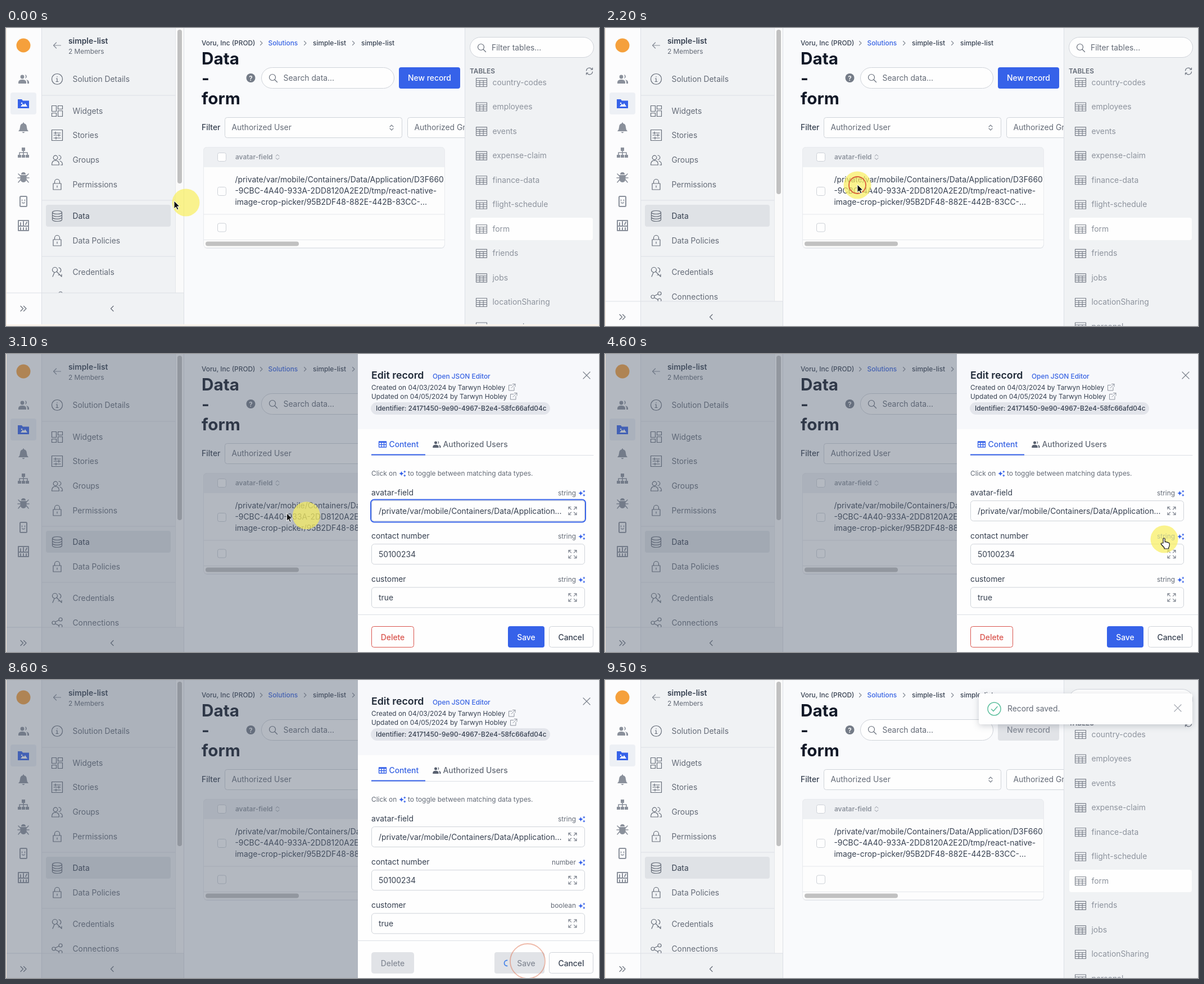
Animation, 1055 px wide and 531 px high, one loop 9.7 s. Source, as an HTML page:

```html
<!DOCTYPE html>
<html lang="en">
<head>
<meta charset="utf-8">
<title>Edit record</title>
<style>
html, body { margin: 0; width: 100%; height: 100%; overflow: hidden; background: #f9fafc; }
svg { display: block; width: 1055px; height: 531px; }
text { font: 400 13.86px Inter, sans-serif; fill: #646b77; white-space: pre; }
.s { font-size: 11.88px; }
.m { font-weight: 500; }
.b { font-weight: 600; }
.h { font-size: 29.7px; font-weight: 700; fill: #111827; }
.title { font-size: 17.8px; font-weight: 600; }
.dark { fill: #374151; }
.ink { fill: #1f2937; }
.pale { fill: #8d939d; }
.blue { fill: #3662e3; }
.white { fill: #fff; }
.red { fill: #d9544d; }
.mid { text-anchor: middle; }
.end { text-anchor: end; }
</style>
</head>
<body>
<svg id="stage" viewBox="0 0 1055 531" xmlns="http://www.w3.org/2000/svg"></svg>
<script>
const LOOP = 9700, STEP = 100;
const BLUE = '#3662e9', RED = '#d9544d', GREY = '#8a909b', LINE = '#dcdfe5', EDGE = '#cfd3d9', BUSY = '#e1e3e7';

// Drawing helpers
const text = (x, y, s, cls = '', id = '') => `<text x="${x}" y="${y}" class="${cls}" id="${id}">${s}</text>`;
const box = (x, y, w, h, fill, r = 0, stroke = 'none', extra = '') =>
  `<rect x="${x}" y="${y}" width="${w}" height="${h}" rx="${r}" fill="${fill}" stroke="${stroke}" ${extra}/>`;
const line = (x, y, d, color = '#666d79', width = 1.2, fill = 'none') =>
  `<path transform="translate(${x} ${y})" d="${d}" fill="${fill}" stroke="${color}" stroke-width="${width}" stroke-linecap="round" stroke-linejoin="round"/>`;
const solid = (x, y, d, color = GREY) => line(x, y, d, 'none', 0, color);
const rule = (x1, x2, y, color = LINE) => line(0, 0, `M${x1} ${y}H${x2}`, color, 1);
const disc = (r, x = 0, y = 0) => `M${x - r} ${y}a${r} ${r} 0 1 0 ${2 * r} 0a${r} ${r} 0 1 0 ${-2 * r} 0z`;
const rect = (x, y, w, h) => `M${x} ${y}h${w}v${h}h${-w}z`;
const field = (x, y, w, h, r = 4) => box(x + .5, y + .5, w - 1, h - 1, '#fefefe', r, EDGE);
const checkbox = (x, y) => box(x - 7.5, y - 7.5, 15, 15, '#fefefe', 3, '#cdd1d7');

const PEOPLE = disc(3.4, -2, -4) + 'M-9 8v-2q0-5 7-5t7 5v2zM3-8a3.6 3.6 0 0 1 0 7q2-3 0-7zM5 1q5 1 5 5v2H7V5q0-2-2-4z';
const MAGNIFIER = disc(5.5, -1, -1) + 'M3 3L7.5 7.5';
const GRID = rect(-9.5, -7.5, 19, 15) + 'M-9.5-3.5h19M-9.5 0h19M-9.5 3.7h19M-3.2-3.5V7.5M3.2-3.5V7.5';
const LOCK = rect(-7, -2, 14, 11) + 'M-4.5-2V-5a4.5 4.5 0 0 1 9 0v3M0 2v3';
const CROSS = 'M-6-6L6 6M6-6L-6 6';
const SORT = 'M-3-1.5L0-4.5L3-1.5M-3 1.5L0 4.5L3 1.5';
const OUT = 'M0-4h-5.5v9.5H4V0M1.5-6H6v4.5M6-6L-1 1';
const SPARK = 'M-1.5-4.5Q-1-.5 3 0Q-1 .5-1.5 4.5Q-2 .5-6 0Q-2-.5-1.5-4.5z' +
  'M2.5-4h1.2v-1.3h1.2V-4h1.2v1.2H4.9v1.3H3.7v-1.3H2.5zM2.5 3h1.2V1.7h1.2V3h1.2v1.2H4.9v1.3H3.7V4.2H2.5z';
const ARROW = 'M0-1V13L3.2 10L5.5 15L8 14L5.7 9H10z';
const HAND = 'M-2 7V0q0-2 1.6-2T1.2 0V5q2-1 3 .5 2-.7 2.7.8 2.3-.3 2.3 2v3q0 2-1.5 3.7v2H0v-2Q-3 12-5.5 9q-.8-2 1-2z';
const expand = (x, y) => [[1, 1], [-1, 1], [1, -1], [-1, -1]].map(([a, b]) =>
  line(x, y, `M${7 * a} ${3 * b}V${7 * b}H${3 * a}M${7 * a} ${7 * b}L${2.5 * a} ${2.5 * b}`, '#7f8590')).join('');

function rail() {
  return box(0, 0, 63, 531, '#fcfcfd') + line(0, 0, 'M63.5 0V531', LINE, 1) +
    '<circle cx="31" cy="31" r="12.5" fill="#f5a03c"/>' +
    solid(31, 91, PEOPLE) + box(8, 115, 46, 39, '#edf0f5', 4) +
    solid(31, 135, 'M-10-8h7l2 2.5h11V8h-20z', BLUE) +
    solid(32, 136, 'M-6 4l4-5 2 2 2-3 4 6z' + disc(1.3, -4, -2), '#fff') +
    solid(31, 178, 'M-9 6q3-3 3-7 0-6 5-7v-1.5h2V-8q5 1 5 7 0 4 3 7zM-2.5 7.3h5q-2.5 4-5 0z') +
    solid(31, 222, rect(-3, -9, 6, 6) + rect(-10, 4, 6, 5) + rect(-3, 4, 6, 5) + rect(4, 4, 6, 5)) +
    line(31, 222, 'M0-3V4M-7 4V0H7V4', GREY, 1.6) +
    solid(31, 266, 'M-4-5a4 4 0 0 1 8 0zM-5.5-4h11v6q0 7-5.5 7t-5.5-7z') +
    line(31, 266, 'M-9-6l4 4M9-6l-4 4M-10 1H10M-9 9l4-5M9 9l-4-5', GREY, 1.6) +
    line(31, 309, 'M-4.5-9h9q1.5 0 1.5 1.5v15q0 1.5-1.5 1.5h-9q-1.5 0-1.5-1.5v-15q0-1.5 1.5-1.5z', GREY, 2) +
    line(31, 309, 'M-2.5-1v-2M2.5-1v-2M-2.5 2q2.5 2 5 0', GREY, 1.4) +
    line(31, 352, rect(-9, -9, 18, 18) + 'M-9 1H9M-5 1v-6M0 1v-8M4-2l2-4M-5 9V4M0 9V4M5 9V4', GREY, 2);
}

function sidebar() {
  const items = [
    [91, 'Solution Details', disc(9.5) + 'M-1.5-1H0V4.5M-2 4.5H2M0-4.5v.4'],
    [148, 'Widgets', rect(-9.5, -9.5, 8, 10) + rect(1.5, -9.5, 8, 6) + rect(-9.5, 3.5, 8, 6) + rect(1.5, -.5, 8, 10)],
    [191, 'Stories', rect(-9.5, -9.5, 19, 19) + 'M-6-4H6M-6 0H6M-6 5H6M-3-6v4M3-2v4M-2 3v4'],
    [235, 'Groups', disc(3.8, -3, -4) + 'M-9.5 9q0-8 6.5-8t6.5 8zM3-8a3.6 3.6 0 0 1 0 7.5M5 2q4.5 1 4.5 7H6.5'],
    [279, 'Permissions', LOCK],
    [335, 'Data', 'M-8.5-6.5a8.5 3 0 0 1 17 0v13a8.5 3 0 0 1-17 0zM-8.5-6.5a8.5 3 0 0 0 17 0M-8.5-2a8.5 3 0 0 0 17 0M-8.5 2.3a8.5 3 0 0 0 17 0'],
    [379, 'Data Policies', LOCK],
    [435, 'Credentials', disc(4.5, -4, -4) + 'M-1-1L8 8V4M5 5H2M3-8a4.5 4.5 0 0 1 2 8M-5 1L-8 8'],
    [479, 'Connections', disc(3, -6, 0) + disc(3, 6, -6) + disc(3, 6, 6) + 'M-3.5-1.5L3.5-5M-3.5 1.5L3.5 5']
  ];
  return box(64, 0, 238, 531, '#f0f2f4') + box(302, 0, 14, 531, '#fafafa') +
    line(0, 0, 'M301.5 0V531', '#e5e7eb', 1) + line(0, 0, 'M316.5 0V531', LINE, 1) +
    box(305, 3, 8, 293, '#c1c1c1', 4, 'none', 'id="thumb"') +
    line(91, 31, 'M6.5 0H-6.5M-1.5-5L-6.5 0L-1.5 5', '#858b96') +
    text(111, 28, 'simple-list', 'b dark') + text(111, 45.5, '2 Members', 's') +
    [120, 307, 407].map(y => rule(64, 301, y)).join('') + box(71, 315, 222, 39, '#dfe2e6', 4) +
    items.map(([y, s, d]) => line(91, y, d) + text(118.5, y + 5, s, s === 'Data' ? 'dark' : '')).join('') +
    '<g id="dock">' + box(0, 487, 63, 60, '#fcfcfd') + box(64, 487, 252, 60, '#f0f2f4') + rule(0, 316, 487) +
    line(31, 515, 'M-5-4.5L-.5 0L-5 4.5M.5-4.5L5 0L.5 4.5') + line(189, 515, 'M2-4.5L-2.5 0L2 4.5') + '</g>';
}

function records() {
  const path = ['/private/var/mobile/Containers/Data/Application/D3F660',
    '-9CBC-4A40-933A-2DD8120A2E2D/tmp/react-native-', 'image-crop-picker/95B2DF48-882E-442B-83CC-...'];
  return box(317, 0, 499, 531, '#f9fafc') +
    text(348, 31, 'Voru, Inc (PROD)', 's m dark') + text(466.5, 31, 'Solutions', 's m blue') +
    text(546, 31, 'simple-list', 's m dark') + text(632, 31, 'simple-list', 's m dark') +
    [454, 532, 618].map(x => line(x, 27, 'M-1.5-3.5L2 0L-1.5 3.5', '#858b96')).join('') +
    ['Data', '-', 'form'].map((s, i) => text(348, 64.5 + 35.7 * i, s, 'h')).join('') +
    solid(435.5, 89, disc(8), '#747b87') + text(435.5, 93.5, '?', 's b white mid') +
    field(454, 70, 237, 38, 19) + line(475, 89, MAGNIFIER) + text(493.5, 94, 'Search data...') +
    box(699, 70, 109, 38, BLUE, 4, 'none', 'id="add"') + text(753.5, 94, 'New record', 'm white mid', 'addLabel') +
    text(348, 182, 'Filter', 'm dark') + field(389, 159, 316, 37) + text(401.5, 182, 'Authorized User') +
    line(686, 177.5, SORT, '#7b828d') + field(714, 159, 316, 37) + text(726.5, 182, 'Authorized Group') +
    box(351.5, 213, 429, 180, '#e3e6ea', 6) + box(351, 212, 429, 180, '#fdfdfd', 6) +
    '<path d="M351 248V218q0-6 6-6H774q6 0 6 6V248z" fill="#eef0f3"/>' +
    box(351.5, 212.5, 429, 179, 'none', 6, '#e8eaee') + rule(352, 780, 332, '#e5e7eb') + rule(352, 780, 377.5, '#e5e7eb') +
    checkbox(384, 230) + checkbox(384, 291) + checkbox(384, 355.5) +
    text(408, 234, 'avatar-field', 's b pale') + line(483, 230, SORT, '#8d939d', 1) +
    '<clipPath id="cell"><rect x="400" y="250" width="380" height="80"/></clipPath><g clip-path="url(#cell)">' +
    path.map((s, i) => text(407.5, 275 + 19.8 * i, s, 'dark')).join('') + '</g>' +
    box(355, 380.5, 166, 8, '#c1c1c1', 4);
}

function tables() {
  const names = ['country-codes', 'employees', 'events', 'expense-claim', 'finance-data', 'flight-schedule',
    'form', 'friends', 'jobs', 'locationSharing', 'personal'];
  return box(816, 0, 239, 531, '#f0f2f4') + line(0, 0, 'M816.5 0V531', LINE, 1) +
    field(825, 16, 221, 37, 18.5) + line(846, 35, MAGNIFIER) + text(864, 39.5, 'Filter tables...') +
    text(825, 81, 'TABLES', 's b') +
    line(1038, 77, 'M-5.5-1A5.5 5.5 0 0 1 4.5-3.5M5.5-6v3h-3M5.5 1A5.5 5.5 0 0 1-4.5 3.5M-5.5 6v-3h3') +
    box(826, 338, 218, 40, '#fefefe', 4) +
    names.map((s, i) => line(846, 97 + 43.55 * i, GRID, '#777d88', 1.1) + text(865.5, 101.5 + 43.55 * i, s, 'pale')).join('');
}

function drawer() {
  const fields = [['avatar-field', '/private/var/mobile/Containers/Data/Application...'],
    ['contact number', '50100234'], ['customer', 'true']];
  const meta = [['Created on 04/03/2024', 900], ['Updated on 04/05/2024', 903]];
  return box(626, 0, 440, 531, '#fefefe') + box(626, 0, 440, 134, '#f7f8fb') +
    text(650, 44, 'Edit record', 'title ink') + text(759, 44, 'Open JSON Editor', 's m blue') +
    meta.map(([s, x], i) => text(650, 63.5 + 16 * i, s + ' by Tarwyn Hobley', 's dark') + line(x, 59.5 + 16 * i, OUT, '#8d939d', 1)).join('') +
    box(649, 86, 319, 22, '#e3e5eb', 11) + text(658, 101, 'Identifier: 24171450-9e90-4967-B2e4-58fc66afd04c', 's m dark') +
    line(1033, 38, CROSS, '#7b828d') + rule(650, 1045, 180.5) + box(650, 178.5, 96, 2, BLUE) +
    line(670, 161, rect(-6.5, -5, 13, 10) + 'M-6.5-3.5h13M-6.5 .5h13M-2-3v8M2.5-3v8', BLUE, 1.3) + text(681.5, 165.5, 'Content', 'm blue') +
    `<g transform="translate(766 161) scale(.75)">${solid(0, 0, PEOPLE, '#596170')}</g>` + text(777.5, 165.5, 'Authorized Users', 'm') +
    text(650, 217, 'Click on', 's') + solid(705, 213, SPARK, BLUE) + text(715, 217, 'to toggle between matching data types.', 's') +
    fields.map(([name, value], i) => {
      const y = 261 + 77.2 * i;
      return text(650, y - 9, name, 'dark') + text(1014, y - 9, 'string', 's end', 'type' + i) +
        solid(1024, y - 13, SPARK, BLUE) + field(650, y, 380, 37, 5) + text(663, y + 23.5, value, 'dark') + expand(1008, y + 18.5);
    }).join('') +
    box(649, 259.5, 382, 40, 'none', 6, BLUE, 'stroke-width="2" id="focus"') +
    rule(626, 1055, 464.5) +
    box(650.5, 485.5, 75, 37, '#fefefe', 4, RED, 'id="del"') + text(688, 509.5, 'Delete', 'm red mid', 'delLabel') +
    box(893, 485, 65, 38, BLUE, 4, 'none', 'id="save"') + text(925.5, 509.5, 'Save', 'm white mid', 'saveLabel') +
    '<path id="spinner" d="M0-5A5 5 0 0 0 0 5" fill="none" stroke="#4a86e8" stroke-width="1.8" stroke-linecap="round"/>' +
    field(966, 485, 79, 38) + text(1005.5, 509.5, 'Cancel', 'm dark mid');
}

function toast() {
  return box(665, 24, 380, 55, '#fefefe', 4, 'none', 'style="filter:drop-shadow(0 3px 6px rgba(20,30,50,.2))"') +
    line(692.5, 51.5, disc(11.5) + 'M-5 .5L-1.5 4L5.5-4', '#5cbf9d', 1.5) +
    text(716, 56, 'Record saved.') + line(1019, 50, CROSS, '#a0a5ae');
}

const stage = document.getElementById('stage');
stage.innerHTML = rail() + sidebar() + records() + tables() +
  box(0, 528, 1055, 3, '#faf4ec', 0, 'none', 'id="strip"') +
  box(0, 0, 1055, 531, '#556173', 0, 'none', 'id="shade"') +
  `<g id="drawer">${drawer()}</g><g id="toast">${toast()}</g>` +
  '<circle id="glow" r="24.5" fill="rgba(250,240,95,.7)"/>' +
  '<circle id="ring" fill="none" stroke="#d9603c" stroke-width="1.8"/>' +
  `<path id="arrow" d="${ARROW}" fill="#111" stroke="#fff" stroke-linejoin="round"/>` +
  `<path id="hand" d="${HAND}" fill="#fff" stroke="#111" stroke-width="1.2" stroke-linejoin="round"/>` +
  box(0, 0, 1, 531, '#f6e7d8');
const el = Object.fromEntries([...stage.querySelectorAll('[id]')].map(n => [n.id, n]));

// Motion: [start, end, x, y] and [time, x, y]
const START = [320, 311];
const MOVES = [[0, 1200, 449, 280], [2700, 4300, 995, 330], [5600, 6300, 1005, 406], [7000, 7900, 928, 501]];
const CLICKS = [[2000, 449, 280], [5000, 995, 330], [6480, 1004, 403], [8000, 928, 501]];
const clamp = v => Math.max(0, Math.min(1, v));
const span = (t, a, b) => clamp((t - a) / (b - a));
const easeOut = u => 1 - (1 - u) ** 2;
const easeInOut = u => u * u * (3 - 2 * u);

function pointer(t) {
  if (t < 0) return [START[0] + .21 * t, START[1] + .02 * t];
  let [x, y] = START;
  MOVES.forEach(([a, b, toX, toY], i) => {
    const u = (i ? easeInOut : easeOut)(span(t, a, b));
    x += (toX - x) * u;
    y += (toY - y) * u;
  });
  return [x, y];
}

const set = (node, attrs) => Object.entries(attrs).forEach(([k, v]) => node.setAttribute(k, v));
const show = (node, on) => node.setAttribute('visibility', on ? 'visible' : 'hidden');
const place = (node, x, y) => node.setAttribute('transform', `translate(${x} ${y})`);

function render(t) {
  const short = t < 1300, saving = t >= 8200;
  place(el.dock, 0, short ? -15 : 0);
  set(el.thumb, { height: short ? 274 : 293 });
  show(el.strip, short);

  const open = easeOut(span(t, 2250, 2614)) * (1 - easeInOut(span(t, 9050, 9350)));
  place(el.drawer, 429 * (1 - open), 0);
  set(el.drawer, { opacity: clamp(open + .3) });
  show(el.drawer, open > 0);
  set(el.shade, { opacity: .44 * span(t, 2250, 2450) * (1 - span(t, 9100, 9400)) });
  show(el.focus, t < 3500);

  const [x, y] = pointer(t), [cx, cy] = pointer(t - STEP);
  const near = (px, py) => Math.hypot(x - px, y - py) < 24;
  el.type1.textContent = t >= 5100 ? 'number' : 'string';
  el.type2.textContent = t >= 6500 ? 'boolean' : 'string';
  el.type1.style.fill = near(995, 330) ? BLUE : '';
  el.type2.style.fill = near(1005, 406) ? BLUE : '';

  set(el.del, { fill: saving ? BUSY : '#fefefe', stroke: saving ? BUSY : RED });
  set(el.save, { x: saving ? 869 : 893, width: saving ? 89 : 65, fill: saving ? BUSY : BLUE });
  set(el.add, { fill: saving ? BUSY : BLUE });
  for (const id of ['delLabel', 'saveLabel', 'addLabel']) el[id].style.fill = saving ? '#858b96' : '';
  show(el.spinner, saving && open > 0);
  set(el.spinner, { transform: `translate(891.5 504.5) rotate(${(t - 8600) * .6})` });

  const arrive = easeOut(span(t, 9150, 9450));
  set(el.toast, { opacity: arrive });
  place(el.toast, 0, -30 * (1 - arrive));

  const visible = t < 8400;
  const hand = t > 2700 && (near(995, 330) || near(1005, 406) || near(928, 501));
  place(el.glow, x, y);
  place(el.arrow, cx, cy);
  place(el.hand, cx, cy);
  show(el.glow, visible);
  show(el.arrow, visible && !hand);
  show(el.hand, visible && hand);

  const click = CLICKS.find(([at]) => t >= at && t < at + 750);
  show(el.ring, click);
  if (click) {
    const age = t - click[0];
    set(el.ring, { cx: click[1], cy: click[2], r: 7 + .04 * age, opacity: clamp((750 - age) / 350) });
  }
}

const began = performance.now();
function tick() {
  const t = (performance.now() - began) % LOOP;
  render(Math.floor(t / STEP) * STEP);
  requestAnimationFrame(tick);
}
tick();
</script>
</body>
</html>
```
